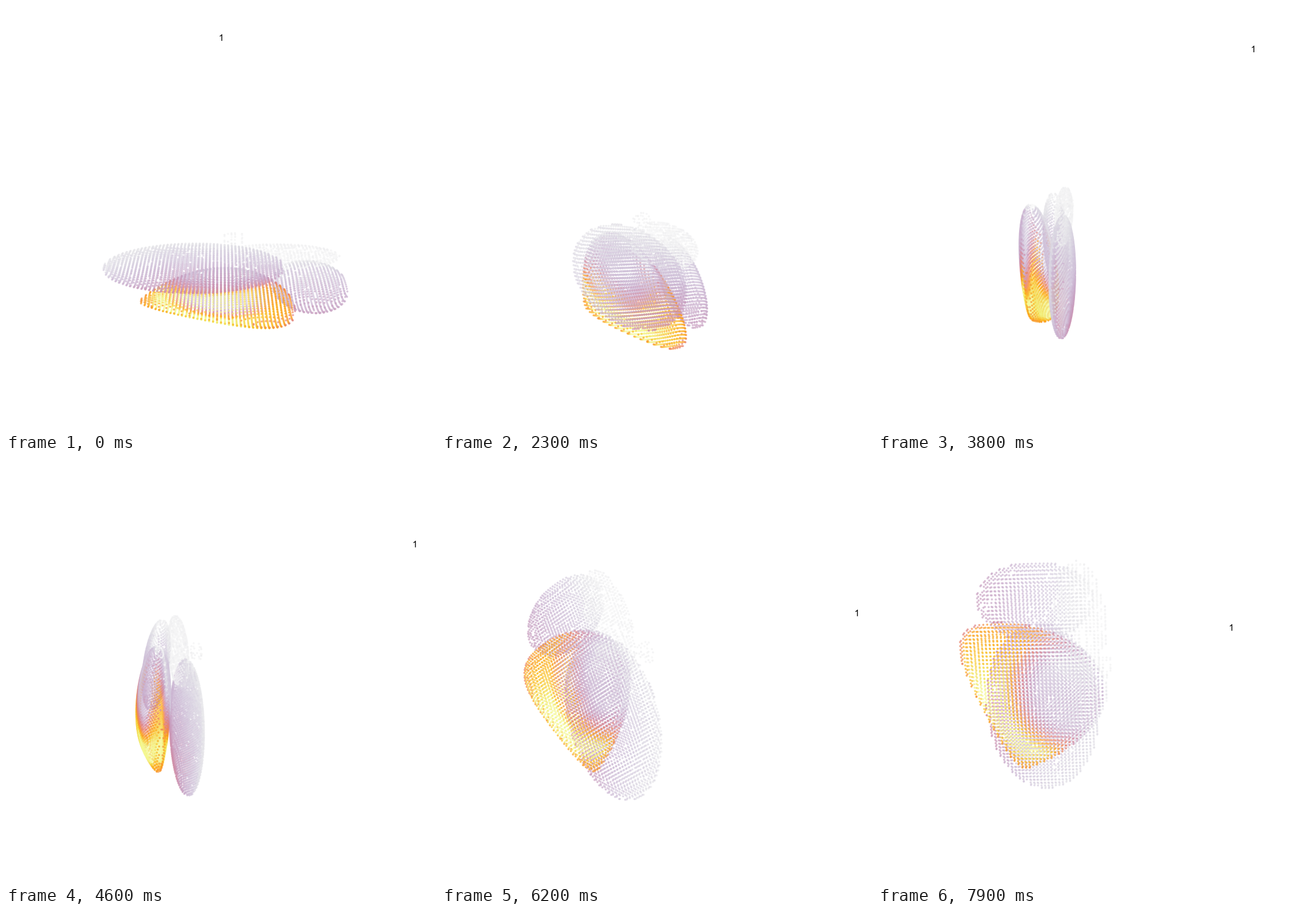
A matplotlib script that plays this animation: 753 by 744 pixels, repeating every 8 s.

```python
import numpy as np
import matplotlib.pyplot as plt
from matplotlib.animation import FuncAnimation
from matplotlib.patches import Polygon

W, H = 753, 744
FRAMES, STEP_DEG = 80, 3
CENTER_X, CENTER_Y = W / 2, H / 2 + 1
PITCH = 6.3                                # lattice spacing
DIST = H / 2 / np.tan(np.radians(15))      # camera distance for a 30 degree view
TILT = np.radians(20)
LABEL = np.array([[0.0, 277.5, 277.5]])

rng = np.random.default_rng(4)
A, B = np.meshgrid(np.arange(-33, 34) * PITCH, np.arange(-34, 8) * PITCH, indexing="ij")


def ramp(x, start, end):
    return np.clip((x - start) / (end - start), 0, 1)


def ellipse(a0, b0, ra, rb):
    """Squared relative thickness of a lens; negative outside."""
    return 1 - ((A - a0) / ra) ** 2 - ((B - b0) / rb) ** 2


def heart():
    """Egg with a low tip and a leaning top."""
    s = np.clip((A + 137) / 257, 0, 1)
    half = s ** 0.8 * (1 - s) ** 0.45 * 255
    middle = -80 - 200 * (s - 0.43) ** 2
    return (half ** 2 - (B - middle) ** 2) / 105 ** 2


def lobe(thick, c0, depth, slope_b, value, keep=1.0):
    """Lower and upper skin of a lens, with value(a, b, thick, side) on it."""
    inside = (thick > 0) & (rng.random(A.shape) < keep)
    a, b, t = A[inside], B[inside], thick[inside]
    skins, levels = [], []
    for side in (-1, 1):
        c = c0 + slope_b * (b + 85) + side * depth * np.sqrt(t)
        skins.append(np.column_stack([a, b, c]))
        levels.append(value(a, b, t, side) + np.zeros(a.size))
    return np.vstack(skins), np.concatenate(levels)


def heart_value(a, b, t, side):
    chamber = np.hypot(b + 32, a + 2) / 75
    glow = 0.27 + 0.72 * ramp(chamber, 0.75, 1.5)
    glow -= 0.25 * ramp(a, 0, 120) + 0.25 * ramp(t, 0.15, 0)
    return glow - 0.08 * (side > 0) * ramp(b, -170, -60)


def upper_value(a, b, t, side):
    return 0.2 + 0.15 * ramp(b, -80, -170) - 0.15 * ramp(b, -70, 0)


def sheet_value(a, b, t, side):
    low = 0.08 + 0.12 * ramp(b, 0, -80) + 0.22 * ramp(b, -90, -170)
    return low * (1 - 0.5 * ramp(a, -80, -190)) + 0.05 * (side < 0)


def faint_value(a, b, t, side):
    return 0.04


lobes = [
    lobe(heart(), -105, 24, -0.06, heart_value),
    lobe(ellipse(150, -85, 64, 95), -88, 22, 0, upper_value, 0.97),
    lobe(ellipse(-45, -85, 152, 98), -54, 15, 0, sheet_value, 0.96),
    lobe(ellipse(100, -20, 108, 48), -62, 12, 0, faint_value, 0.8),
    lobe(ellipse(25, 22, 25, 14), -45, 9, 0, faint_value, 0.6),
]
points = np.vstack([p for p, _ in lobes])
level = np.concatenate([v for _, v in lobes])
level = np.clip(level + rng.normal(0, 0.01, level.size), 0.02, 0.98)

# weak values fade to white but still cover what lies behind
strength = np.clip(1.2 * level, 0, 1)[:, None]
colors = plt.get_cmap("inferno")(level)
colors[:, :3] = 1 - strength * (1 - colors[:, :3])
colors[:, 3] = 0.68


def project(xyz, deg):
    """Turn about (1, 1, 1), tilt and apply perspective; returns pixels and depth."""
    def f(shift):
        return (1 + 2 * np.cos(np.radians(deg + shift))) / 3
    turn = np.array([[f(0), f(120), f(-120)],
                     [f(-120), f(0), f(120)],
                     [f(120), f(-120), f(0)]])
    x, y, z = turn @ xyz.T
    up = np.cos(TILT) * z + np.sin(TILT) * y
    depth = np.sin(TILT) * z - np.cos(TILT) * y
    scale = DIST / (DIST - depth)
    return np.column_stack([CENTER_X + scale * x, CENTER_Y - scale * up]), depth


fig = plt.figure(figsize=(W / 100, H / 100), dpi=100, facecolor="white")
ax = fig.add_axes([0, 0, 1, 1])
ax.set(xlim=(0, W), ylim=(H, 0))
ax.axis("off")
dots = ax.scatter(points[:, 0], points[:, 1], s=(3.7 * 0.72) ** 2, c=colors, linewidths=0)

# the digit 1 without a foot, in pixels around its middle
DIGIT = np.array([(2.1, 5.7), (0.7, 5.7), (0.7, -3.2), (-2.1, -1.6),
                  (-2.1, -3.0), (-0.2, -4.2), (1.2, -5.8), (2.1, -5.8)])
label = ax.add_patch(Polygon(DIGIT, facecolor="black", linewidth=0))


def draw(frame):
    deg = frame * STEP_DEG
    xy, depth = project(points, deg)
    order = np.argsort(depth)
    dots.set_offsets(xy[order])
    dots.set_facecolors(colors[order])
    label.set_xy(DIGIT + project(LABEL, deg)[0])
    return dots, label


anim = FuncAnimation(fig, draw, frames=FRAMES, interval=100, repeat=True, repeat_delay=0)
plt.show()
```
